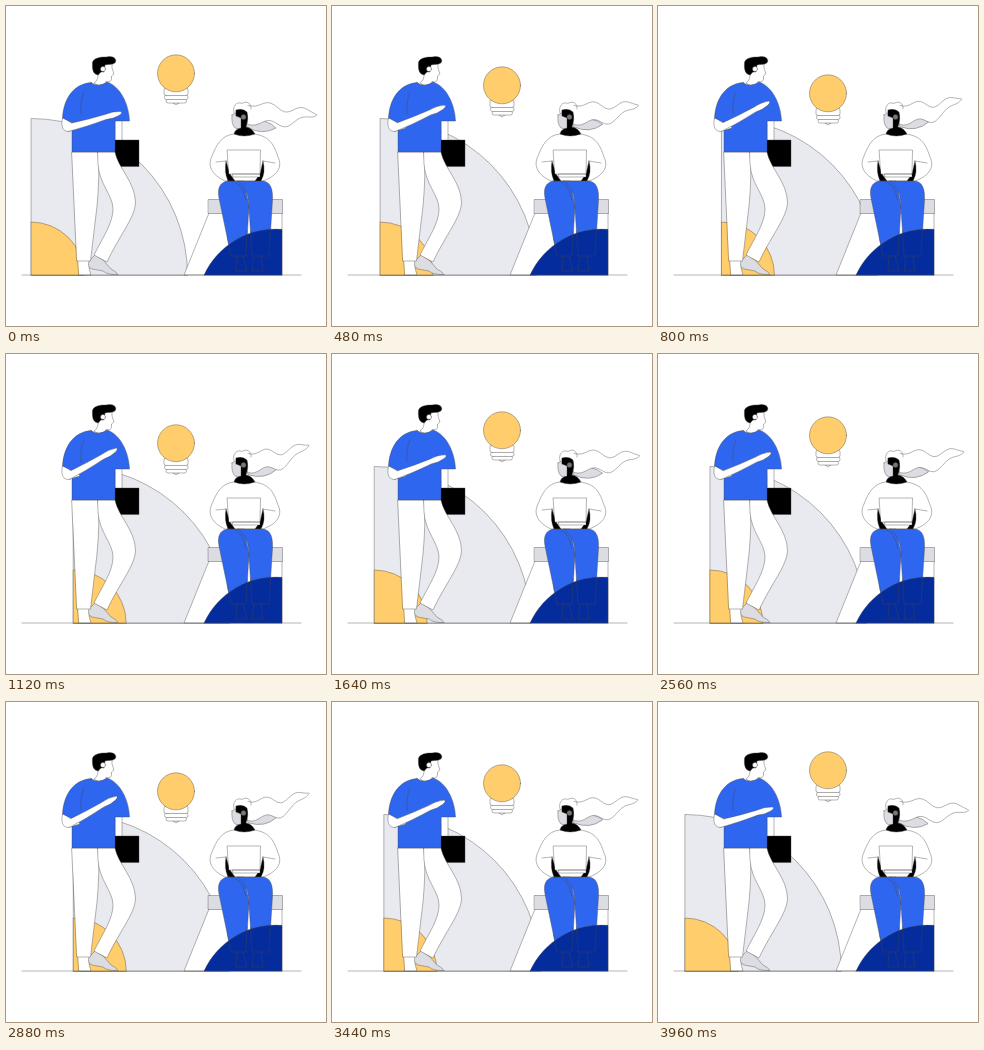
Animation, 320 px wide and 320 px high, one loop 4 s. Source, as an HTML page:

```html
<!DOCTYPE html>
<html lang="en">
<head>
<meta charset="utf-8">
<title>Idea talk</title>
<style>
  html, body { margin: 0; width: 100%; height: 100%; overflow: hidden; background: #fff; }
  svg { display: block; width: 100vw; height: 100vh; }
  .scene { stroke: #444; stroke-width: .4; stroke-linejoin: round; stroke-linecap: round; fill: #fff; }
  .blue { fill: #2f66f0; }
  .navy { fill: #042c9d; }
  .gold { fill: #ffcd6c; }
  .pale { fill: #e9e9f0; }
  .grey { fill: #dcdde3; }
  .black { fill: #000; }
  .line { fill: none; }
</style>
</head>
<body>
<svg viewBox="0 0 320 320">
  <g class="scene">
    <g id="quarters">
      <path class="pale" d="M25 269V112.500A156.500 156.500 0 0 1 181.500 269Z"/>
      <path class="gold" d="M25 269V216A53 53 0 0 1 78 269Z"/>
    </g>

    <!-- seat -->
    <path d="M203 207L178 269H276V207Z"/>
    <path class="grey" d="M202.500 193.500H276.500V207.500H202.500Z"/>

    <g id="bulb">
      <path d="M167 97L170 99L173 97Z"/>
      <rect x="160" y="93" width="20.500" height="4" rx="2"/>
      <rect x="158.500" y="89" width="23.500" height="4.500" rx="2"/>
      <rect x="158" y="82" width="24" height="7.500" rx="2"/>
      <circle class="gold" cx="170" cy="67.300" r="18.500"/>
    </g>

    <!-- standing figure -->
    <path d="M109.500 114H116V136H109.500Z"/>
    <path class="black" d="M109 134H133V160.500H109Z"/>
    <path d="M72 254H84L83 262L85 269H73Z"/>
    <path class="grey" d="M89 249L83 255Q81 261 86 263L97 265Q101 269 112 268.500Q111 266 105 263L98 255Z"/>
    <path d="M66 146H92Q94 168 91 200L84.500 255H71Z"/>
    <path d="M92 146H109C112 162 129 176 129.500 196C129.500 211 113 230 101 256L88 249C97 231 107 217 107 203C107 189 93 178 92 158Z"/>
    <path d="M92 66Q93 74 88 77Q94 82 100 77V75.500Q105 77 105.500 73V70L108 68L106 62V55H94Z"/>
    <path class="black" d="M92 69C87 68 86 64 86.500 56C89 51 96 51 100 51C107 49 111 53 109.500 56C108 59 103 58 99 59L98 66H95Z"/>
    <circle cx="97" cy="63" r="2.500"/>
    <path class="blue" d="M85 76.500Q92 82 101 76C114 80 123 98 123.500 115H109V146H66V117L56.500 113C57 95 66 78 85 76.500Z"/>
    <path class="line" d="M78 86Q74 94 75 108"/>
    <path d="M56.500 112C55 119 56 125 62 125.500L74 122L70 116L66 117Z"/>
    <path id="forearm" d="M66 117Q84 113 99 108.500Q107 105 115 105.500Q117 107 113 109.500Q107 113 100 113.500Q80 121 62 125.500"/>

    <!-- sitting figure -->
    <path d="M228 128C215 129 210 140 206 150C201 160 206 169 219 175H257C271 170 277 161 272 151C268 139 264 130 248 128Z"/>
    <path class="line" d="M210 156L220 155M257 155L269 157"/>
    <path class="black" d="M220 155Q218 166 222 175H229L224 168ZM257 155Q260 166 255 175H249L254 168Z"/>
    <path class="blue" d="M222 175H238L243 200L240 250H225L213 192C211 182 214 176 222 175Z"/>
    <path class="blue" d="M232 175H257C265 176 267 184 266.500 194L263 250H246L242.500 194Q241 182 232 175Z"/>
    <path class="line" d="M222 175Q237 174 239.500 194"/>
    <path class="navy" d="M198 269A79 79 0 0 1 276 223.300V269Z"/>
    <path class="line" d="M221.500 232L225 250H240L241 225M244.500 225L246 250H263L264.500 223M231 250L230 265H241L237 250M248 250L246 265H257L255 250"/>
    <path d="M221.500 144H254.500L254 168H223ZM227 168H254V171H227Z"/>

    <path id="undercoat" class="grey" d="M241 113Q262 113 270 122Q256 130 241 121Z"/>
    <path id="hair"/>
    <path style="stroke:none" d="M233 103H246V117H238Z"/>
    <path class="grey" d="M226 109L233 105L238 111L236 124L229 122Q225 118 226 109Z"/>
    <path class="line" d="M228 107C226 100 231 95 236 97.500C241 94 246 98 245 103"/>
    <path class="black" d="M230 104Q237 102 241 106Q243 113 240 121Q246 122 249 128Q238 132 228 128Q229 123 235 122L235 112L230 110Z"/>
    <circle cx="237.500" cy="111" r="2.500" style="fill:#777"/>

    <path class="line" d="M16 269H295"/>
  </g>
</svg>
<script>
  const STEPS = 28;
  const move = (id, transform) => document.getElementById(id).setAttribute("transform", transform);

  // One edge point of the waving hair: s runs from head to tip, side is -1 (top) or 1 (bottom).
  function hairPoint(s, side, lift) {
    const wave = 4.5 * Math.sin(Math.PI * s) * Math.cos(2 * Math.PI * (s - 0.55) / 0.55);
    const halfWidth = 9.5 * (1 - s * s) ** 0.7;
    const x = 242 + (69 - 9 * lift) * s;
    const y = 109 + wave - 20 * lift * s * s + side * halfWidth;
    return `${x.toFixed(2)} ${y.toFixed(2)}`;
  }

  function hairPath(lift) {
    const points = [];
    for (let i = -STEPS; i <= STEPS; i++) {
      // Samples crowd towards the tip so that it stays round.
      const s = Math.cos(Math.PI / 2 * i / STEPS);
      points.push(hairPoint(s, Math.sign(i), lift));
    }
    return "M" + points.join("L");
  }

  const start = performance.now();

  function draw(now) {
    const t = Math.max(0, now - start) % 2000;
    const lift = 1 - Math.abs(1 - t / 1000);
    move("quarters", `translate(${48 * lift} 0)`);
    move("bulb", `translate(0 ${25 * lift})`);
    move("forearm", `rotate(${-15 * lift} 63 120)`);
    move("undercoat", `rotate(${-15 * lift} 241 115)`);
    document.getElementById("hair").setAttribute("d", hairPath(lift));
    requestAnimationFrame(draw);
  }
  draw(start);
</script>
</body>
</html>
```
